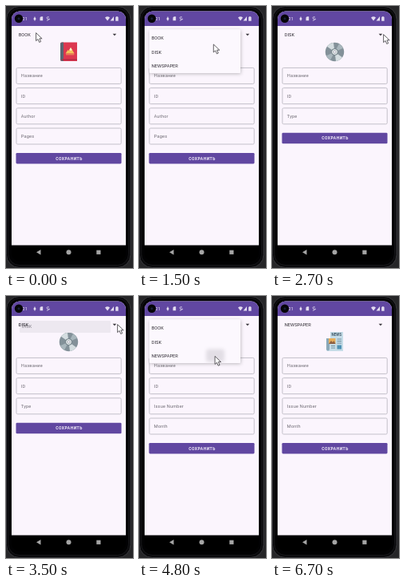
Recreate the animation shown at these times as an HTML page. Size 159x328 px, loop 6.8 s.

```html
<!DOCTYPE html>
<html lang="ru">
<head>
<meta charset="utf-8">
<style>
html, body { margin: 0; width: 100%; height: 100%; overflow: hidden; background: #262628; }
svg { display: block; width: 159px; height: 328px; }
text { font: 5.7px Roboto, Arial, sans-serif; fill: #2f2c33; }
.hint { font-size: 5.6px; letter-spacing: .2px; fill: #6f6c74; }
.save { font-size: 5px; font-weight: bold; letter-spacing: .5px; fill: #f4effa; text-anchor: middle; }
.field { fill: none; stroke: #c3c0c9; }
</style>
</head>
<body>
<svg viewBox="0 0 159 328">
  <defs>
    <filter id="shadow" x="-10%" y="-10%" width="120%" height="130%">
      <feDropShadow dx=".5" dy="1" stdDeviation="2" flood-opacity=".25"/>
    </filter>
    <filter id="blur" x="-40%" y="-40%" width="180%" height="180%"><feGaussianBlur stdDeviation="2"/></filter>
    <clipPath id="screen"><rect x="7" y="6.5" width="143" height="313" rx="10"/></clipPath>
  </defs>

  <!-- phone -->
  <rect width="159" height="328" fill="#262628"/>
  <rect x=".5" y=".5" width="155.5" height="327" rx="16" fill="#0a0a0c" stroke="#39393d"/>
  <rect x="3" y="3" width="150.5" height="321.5" rx="14" fill="#020203" stroke="#1b1b1f" stroke-width=".8"/>
  <g clip-path="url(#screen)">
    <rect x="7" y="6" width="143" height="294" fill="#fbf5fd"/>
    <rect x="7" y="6" width="143" height="19" fill="#6147a1"/>
    <rect x="7" y="299.5" width="143" height="21" fill="#000"/>
  </g>

  <!-- status bar -->
  <text x="16" y="18" style="fill:#e8e2f3">9:21</text>
  <circle cx="16" cy="15.7" r="5.2" fill="#050507"/>
  <circle cx="16" cy="15.7" r="1.5" fill="#17203a"/>
  <g fill="#e3ddf0">
    <circle cx="36" cy="16" r="1.5"/><path d="M35.5 13.5h1v5h-1z"/>
    <path d="M42.5 14.5l1.3-1.2h2.4v5h-3.7z"/>
    <path d="M124 14.5q3-2.3 6 0l-3 4z"/>
    <path d="M135 13v5.5h-4.5z"/>
    <path d="M137.2 13.7h1v-.7h1.4v.7h1v5h-3.4z"/>
  </g>
  <path d="M54 14q-3-1-3 .8t2.8 1.5-2.8 2" fill="none" stroke="#e3ddf0" stroke-width=".8"/>

  <!-- navigation -->
  <g fill="#a5a5a5">
    <path d="M38 308.3l5.5-3.2v6.4z"/><circle cx="78.5" cy="308.3" r="3"/>
    <rect x="113.3" y="305.7" width="5.2" height="5.2"/>
  </g>

  <text id="kind" x="15.8" y="38"></text>
  <path d="M133.6 34.8h4.6l-2.3 2.4z" fill="#3c393f"/>

  <g id="BOOK">
    <path d="M70 45.5h19v23.5H70q-2 0-2-2V47.5q0-2 2-2z" fill="#dc3850"/>
    <path d="M70 45.5h2v23.5h-2q-2 0-2-2V47.5q0-2 2-2z" fill="#5a6672"/>
    <path d="M70 66.5h19v1.5H70z" fill="#b52b43"/>
    <path d="M74.5 59.5l3-4.5 1.2 1 2.3-4 4.7 7.5z" fill="#f4c35a"/>
    <path d="M79.2 55l1.8-3 1.8 3-1.8 1z" fill="#fff0ca"/>
    <path d="M75 60.8h10.3" stroke="#ef9a56"/>
  </g>
  <g id="DISK">
    <circle cx="78.5" cy="57.5" r="11.7" fill="#839199"/>
    <path d="M78.5 57.5L69 50.8A11.7 11.7 0 0 1 77 46zM78.5 57.5L88 64.2A11.7 11.7 0 0 1 80 69z" fill="#d4dde0"/>
    <path d="M78.5 57.5L84 47.2A11.7 11.7 0 0 1 89 52.7zM78.5 57.5L73 67.8A11.7 11.7 0 0 1 68 62.3z" fill="#a8b6bc"/>
    <circle cx="78.5" cy="57.5" r="4" fill="#e2e8e9" stroke="#65757d"/>
    <circle cx="78.5" cy="57.5" r="1.7" fill="#fbf5fd" stroke="#758389" stroke-width=".6"/>
  </g>
  <g id="NEWSPAPER">
    <path d="M73 45h16v24H70q-2 0-2-2V53h5z" fill="#c5dce7"/>
    <path d="M68 53h4v14q-2 3-4 0z" fill="#8aa8b8"/>
    <text x="74.6" y="50.2" style="font-size:4.5px;font-weight:bold;fill:#405768">NEWS</text>
    <rect x="71" y="53" width="8.5" height="7" fill="#e7ad58"/>
    <path d="M71 60l3-4 2 2 1.5-2 2 4z" fill="#8d6045"/>
    <path d="M81.5 54h5.5m-5.5 2.5H87M81.5 59H87M74 62.5h5m-5 2.5h5" stroke="#698899" stroke-width=".9"/>
    <rect x="81.5" y="61.5" width="5.5" height="5" fill="#4e91b4"/>
  </g>

  <g id="fields"></g>
  <g id="save">
    <rect x="12.5" y="0" width="132" height="13.4" rx="1.3" fill="#6147a1"/>
    <text class="save" x="79" y="8.6">СОХРАНИТЬ</text>
  </g>

  <g id="opening">
    <rect x="17" y="31" width="114" height="15" rx="1" fill="#ebe7ee" opacity=".85"/>
    <text x="15.8" y="38" id="under"></text>
    <text x="20" y="40" style="fill:#85818a">DISK</text>
  </g>
  <g id="menu">
    <rect x="13" y="29.5" width="114" height="54.5" rx="1.5" fill="#fcf8fe" filter="url(#shadow)"/>
    <rect id="ripple" x="59.5" width="23" height="16" rx="3" fill="#e2dee5" filter="url(#blur)"/>
    <text x="15.8" y="42.3">BOOK</text>
    <text x="15.8" y="59.8">DISK</text>
    <text x="15.8" y="77.3">NEWSPAPER</text>
  </g>
  <path id="cursor" d="M.6 .6v10l2.4-2.1 1.7 3.9 1.9-.8-1.7-3.8h3.2z" fill="#fff" stroke="#3a383d" stroke-width=".8"/>
</svg>
<script>
const $ = id => document.getElementById(id);
const LOOP = 6800;
const forms = {
  BOOK: ["Название", "ID", "Author", "Pages"],
  DISK: ["Название", "ID", "Type"],
  NEWSPAPER: ["Название", "ID", "Issue Number", "Month"]
};
// time, x, y of the pointer
const path = [
  [0, 37, 33], [100, 37, 33], [700, 135, 35], [1200, 135, 35],
  [1700, 70, 54], [2100, 70, 54], [2600, 139, 35], [3600, 139, 35],
  [4100, 95, 74], [4700, 95, 74], [5000, 93, 77], [5400, 93, 77],
  [6000, 134, 76], [6500, 160, 72], [LOOP, 160, 72]
];
// opening and choosing times of the list, with the chosen row and its left edge
const menus = [[1100, 1900, 57, 59.5], [3500, 4800, 74.5, 84]];
let shown;

const clamp = v => Math.max(0, Math.min(1, v));

function showForm(kind) {
  if (kind === shown) return;
  shown = kind;
  const labels = forms[kind];
  for (const id in forms) $(id).style.display = id === kind ? "" : "none";
  $("kind").textContent = $("under").textContent = kind;
  $("fields").innerHTML = labels.map((label, i) => {
    const y = 77.4 + 25.2 * i;
    return `<rect class="field" x="13" y="${y}" width="131.2" height="20" rx="1.5"/>
      <text class="hint" x="18.8" y="${y + 11.9}">${label}</text>`;
  }).join("");
  $("save").setAttribute("transform", `translate(0 ${83.2 + 25.2 * labels.length})`);
}

function moveCursor(t) {
  const i = path.findIndex(p => p[0] > t);
  const [t0, x0, y0] = path[i - 1], [t1, x1, y1] = path[i];
  const u = (t - t0) / (t1 - t0), e = u * u * (3 - 2 * u);
  $("cursor").setAttribute("transform", `translate(${x0 + (x1 - x0) * e} ${y0 + (y1 - y0) * e})`);
}

function draw(t) {
  showForm(t < 1900 ? "BOOK" : t < 4800 ? "DISK" : "NEWSPAPER");
  let opening = 0, alpha = 0, ripple = 0;
  for (const [start, end, row, left] of menus) {
    if (t >= start && t < start + 100) opening = 1;
    if (t >= start + 100 && t < end + 200) {
      alpha = clamp((end + 200 - t) / 150);
      ripple = clamp((t - end + 150) / 150);
      $("ripple").setAttribute("x", left);
      $("ripple").setAttribute("y", row - 8);
    }
  }
  $("opening").style.opacity = opening;
  $("menu").style.opacity = alpha;
  $("ripple").style.opacity = ripple;
  moveCursor(t);
}

function tick() {
  draw(performance.now() % LOOP);
  requestAnimationFrame(tick);
}
tick();
</script>
</body>
</html>
```
